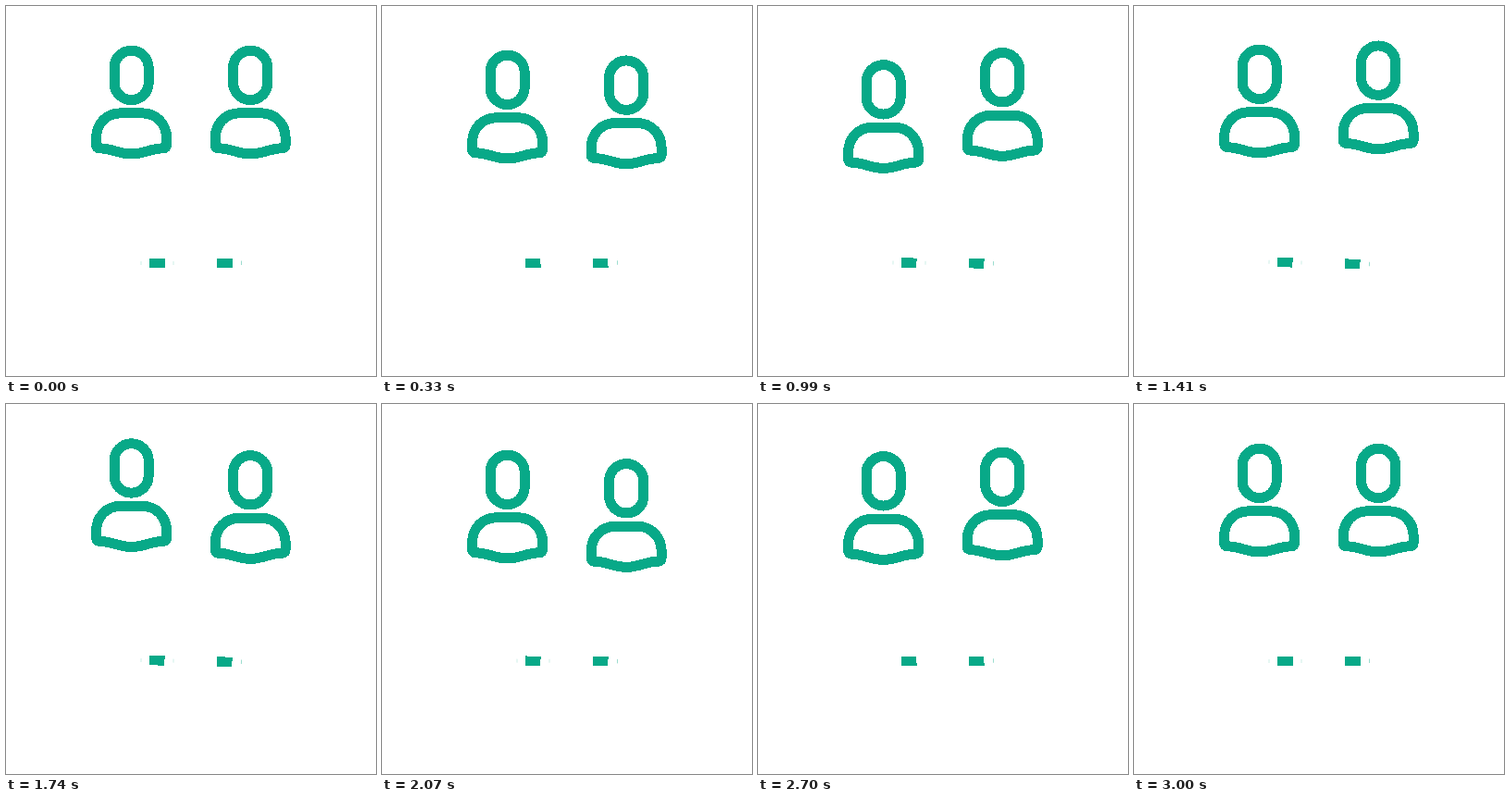
Recreate the animation shown at these times as an HTML page. Size 400 by 400 pixels, loop 3090 ms.

```html
<!DOCTYPE html>
<html lang="en">
<head>
<meta charset="utf-8">
<title>Two people</title>
<style>
html, body { margin: 0; width: 100%; height: 100%; overflow: hidden; background: #fff; }
svg { display: block; width: 100vw; height: 100vh; }
</style>
</head>
<body>
<svg viewBox="0 0 400 400" fill="none" stroke="#08a988">
  <defs>
    <g id="person" stroke-width="11" stroke-linejoin="round" shape-rendering="crispEdges">
      <rect x="117" y="48.2" width="37.2" height="53.4" rx="18.6"/>
      <path d="M124 115.8H147C163 115.8 173.6 128 173.6 143V150Q173.6 153.6 170 153.8C156 154 149 160 135.6 160S115 154 101 153.8Q97.600 153.6 97.600 150V143C97.600 128 108 115.800 124 115.800Z"/>
    </g>
  </defs>
  <use id="left" href="#person"/>
  <use id="right" href="#person"/>
  <g id="bar">
    <path d="M155 278H171.500M228 278H244.500" stroke-width="10.4" shape-rendering="crispEdges"/>
    <path id="faint" d="M146 276V280M181 276V280" opacity=".2"/>
    <path d="M254.500 275.500V280" opacity=".4"/>
  </g>
</svg>
<script>
const LOOP = 3090, STEP = 30, END = 3;
const PERIOD = 1.52, MID = 5.1, SWING = 11.3;
const $ = id => document.getElementById(id);
const ease = p => (1 - Math.cos(Math.PI * p)) / 2;

// Sink from rest to the low point, swing once, then rise back to rest.
function bob(t, low) {
  const next = low + PERIOD, depth = MID + SWING;
  if (t < low) return depth * ease(t / low);
  if (t > next) return depth * ease((END - t) / (END - next));
  return MID + SWING * Math.cos(2 * Math.PI * (t - low) / PERIOD);
}

// Rock one way near both ends of the loop and the other way in between.
function rock(t) {
  const a = Math.PI * t / END;
  return -1.3 * Math.cos(2 * a) * Math.sin(a);
}

function draw(ms) {
  const t = Math.min(END, Math.floor(ms % LOOP / STEP) * STEP / 1000);
  const tilt = rock(t);
  $('left').setAttribute('transform', `translate(0 ${bob(t, .89)})`);
  $('right').setAttribute('transform', `translate(128.6 ${bob(t, .55)})`);
  $('bar').setAttribute('transform', `rotate(${tilt} 200 278)`);
  $('faint').setAttribute('opacity', tilt < -.1 ? 0 : .2);
}

const start = performance.now();
function tick() {
  draw(performance.now() - start);
  requestAnimationFrame(tick);
}
tick();
</script>
</body>
</html>
```
